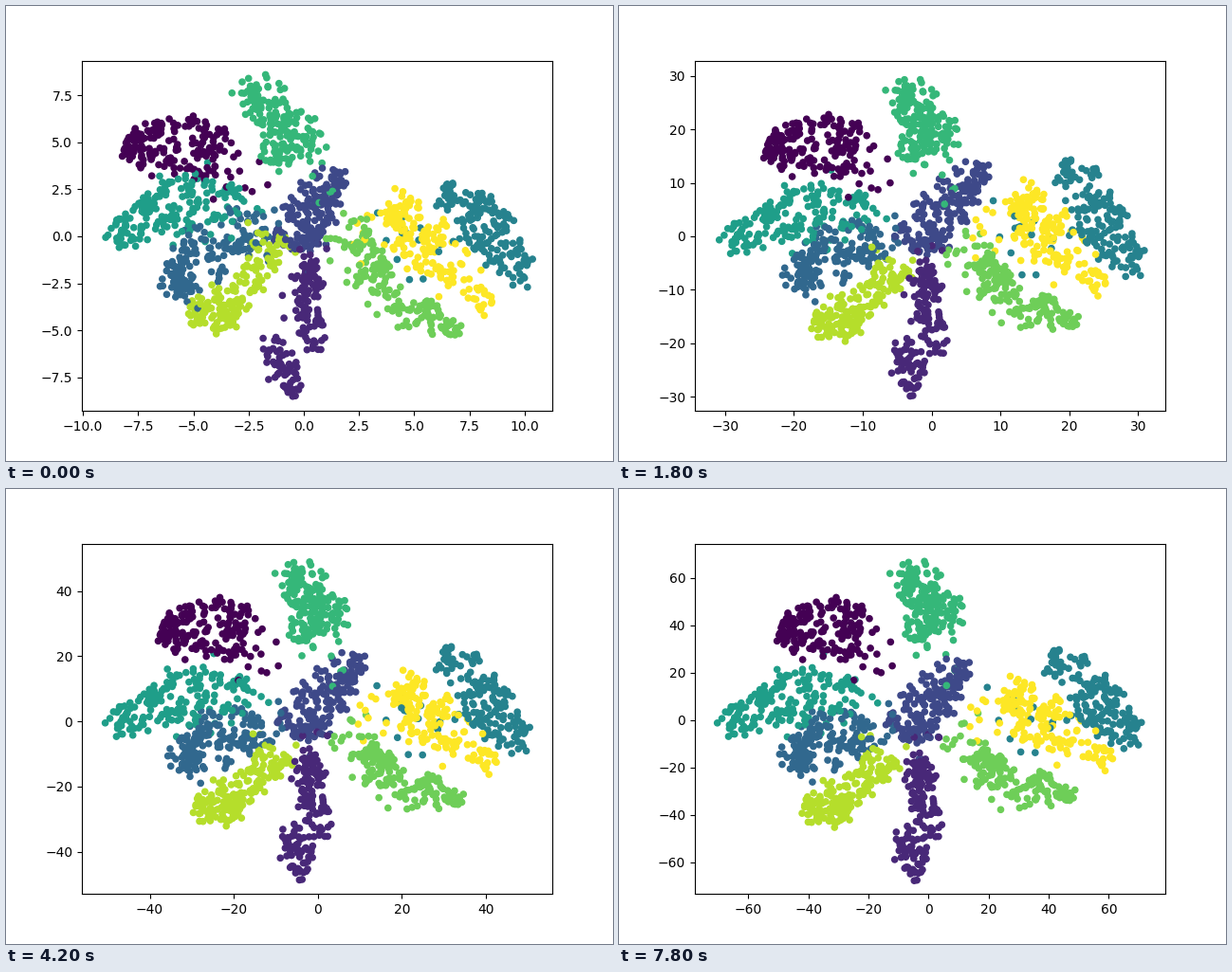
Recreate the animation shown at these times as a matplotlib script. Size 640 by 480 pixels, loop 8000 ms.

```python
import numpy as np
import matplotlib.pyplot as plt
from matplotlib.animation import FuncAnimation

FRAMES, STEP = 40, 200
EARLY = 6  # frame at which the fast unfolding ends
CENTRE = np.array([328, 243])
rng = np.random.default_rng(11)

# Axis limits (x0, x1, y0, y1) at a few frames
KEYS = np.array([0, 6, 13, 17, 26, 32, 39])
LIMITS = np.array([
    [-10.05, 11.25, -9.29, 9.35],
    [-27.7, 27.58, -26.39, 26.41],
    [-42.09, 41.52, -39.8, 40.45],
    [-49.9, 49.3, -47.0, 48.3],
    [-62.6, 62.7, -59.2, 60.7],
    [-69.6, 70.1, -65.6, 66.9],
    [-77.8, 78.8, -73.3, 74.5],
])
SLOPES = np.gradient(LIMITS, KEYS, axis=0)

poses, digits = [], []


def ribbon(pts, widths, u, v):
    """Points at u along, v across a parabola through three points."""
    basis = np.column_stack([(2 * u - 1) * (u - 1), 4 * u * (1 - u), u * (2 * u - 1)])
    slope = np.column_stack([4 * u - 3, 4 - 8 * u, 4 * u - 1]) @ pts
    normal = np.column_stack([-slope[:, 1], slope[:, 0]])
    normal /= np.linalg.norm(normal, axis=1, keepdims=True)
    return basis @ pts + normal * (basis @ widths * v)[:, None]


def cluster(digit, n, widths, start, early, drift):
    """A clumpy ribbon of n points; drift moves its two ends afterwards."""
    a, b = (np.reshape(p, (3, 2)).astype(float) for p in (start, early))
    head, tail = np.reshape(drift, (2, 2))
    c = b + [head, (head + tail) / 2, tail]

    seed = rng.integers(0, n // 2, n)
    u = rng.random(n // 2)[seed]
    v = rng.uniform(-1, 1, n // 2)[seed]
    jitter = rng.normal(0, 4.5, (n, 2))

    # A few points stray towards the middle
    pull = np.where(rng.random(n) < 0.08, rng.uniform(0.1, 0.6, n), 0)[:, None]
    jitter += (pull > 0) * rng.normal(0, 12, (n, 2))

    layers = np.array([ribbon(p, np.array(widths), u, v) for p in (a, b, c)])
    poses.append(layers + (CENTRE - layers) * pull + jitter)
    digits.extend([digit] * n)


cluster(0, 176, (9, 32, 13), (124, 145, 185, 150, 240, 155),
        (152, 147, 210, 149, 264, 147), (17, 0, 3, 0))
cluster(1, 112, (5, 13, 10), (321, 270, 320, 318, 328, 364),
        (325, 274, 329, 320, 339, 368), (-8, 12, -6, 0))
cluster(1, 66, (6, 12, 8), (272, 340, 292, 375, 304, 405),
        (292, 347, 308, 372, 308, 404), (0, 8, 5, 2))
cluster(2, 178, (18, 23, 12), (300, 252, 322, 215, 352, 176),
        (308, 250, 345, 213, 388, 166), (-12, 6, -24, 18))
cluster(3, 178, (14, 25, 18), (170, 300, 205, 268, 268, 224),
        (178, 290, 222, 266, 274, 241), (-4, -5, -12, 12))
cluster(4, 36, (11, 10, 4), (458, 198, 475, 200, 505, 201),
        (466, 172, 482, 174, 508, 174), (-14, 10, -14, 6))
cluster(4, 142, (18, 25, 10), (490, 215, 520, 250, 545, 307),
        (496, 205, 520, 245, 546, 297), (-4, 5, -2, -17))
cluster(5, 178, (17, 24, 24), (113, 248, 170, 212, 253, 205),
        (113, 250, 182, 222, 272, 212), (-2, 0, -15, 2))
cluster(6, 178, (10, 26, 32), (256, 83, 290, 120, 311, 157),
        (302, 83, 320, 122, 334, 151), (5, 0, 8, -6))
cluster(7, 178, (6, 25, 9), (376, 224, 392, 298, 478, 340),
        (388, 250, 402, 305, 483, 332), (-6, 18, -4, -12))
cluster(8, 178, (16, 19, 11), (197, 327, 240, 308, 282, 242),
        (214, 343, 252, 315, 297, 274), (-12, 2, -15, 10))
cluster(9, 178, (12, 26, 8), (400, 209, 448, 252, 513, 320),
        (418, 194, 455, 240, 512, 300), (-14, 22, 8, -12))

poses = np.concatenate(poses, axis=1)
order = rng.permutation(len(digits))
poses, digits = poses[:, order], np.array(digits)[order]

fig, ax = plt.subplots(figsize=(6.4, 4.8), dpi=100)
cloud = ax.scatter(*poses[0].T, s=20, c=digits, cmap="viridis")


def limits(f):
    """Smooth curve through the limit keys."""
    i = min(np.searchsorted(KEYS, f, "right") - 1, len(KEYS) - 2)
    h = KEYS[i + 1] - KEYS[i]
    s = (f - KEYS[i]) / h
    return ((1 + 2 * s) * (1 - s) ** 2 * LIMITS[i]
            + s * (1 - s) ** 2 * h * SLOPES[i]
            + s * s * (3 - 2 * s) * LIMITS[i + 1]
            + s * s * (s - 1) * h * SLOPES[i + 1])


def layout(f):
    """Stage positions of all points, easing from pose to pose."""
    if f <= EARLY:
        k, s, power = 0, f / EARLY, 1.3
    else:
        k, s, power = 1, (f - EARLY) / (FRAMES - 1 - EARLY), 1.6
    return poses[k] + (poses[k + 1] - poses[k]) * (1 - (1 - s) ** power)


def draw(f):
    x0, x1, y0, y1 = limits(f)
    ax.set_xlim(x0, x1)
    ax.set_ylim(y0, y1)
    x, y = layout(f).T
    cloud.set_offsets(np.column_stack([
        x0 + (x - 80) / 496 * (x1 - x0),
        y1 - (y - 57.6) / 369.6 * (y1 - y0),
    ]))
    return cloud,


anim = FuncAnimation(fig, draw, frames=FRAMES, interval=STEP,
                     init_func=lambda: draw(0), repeat=True, repeat_delay=0)
plt.show()
```
